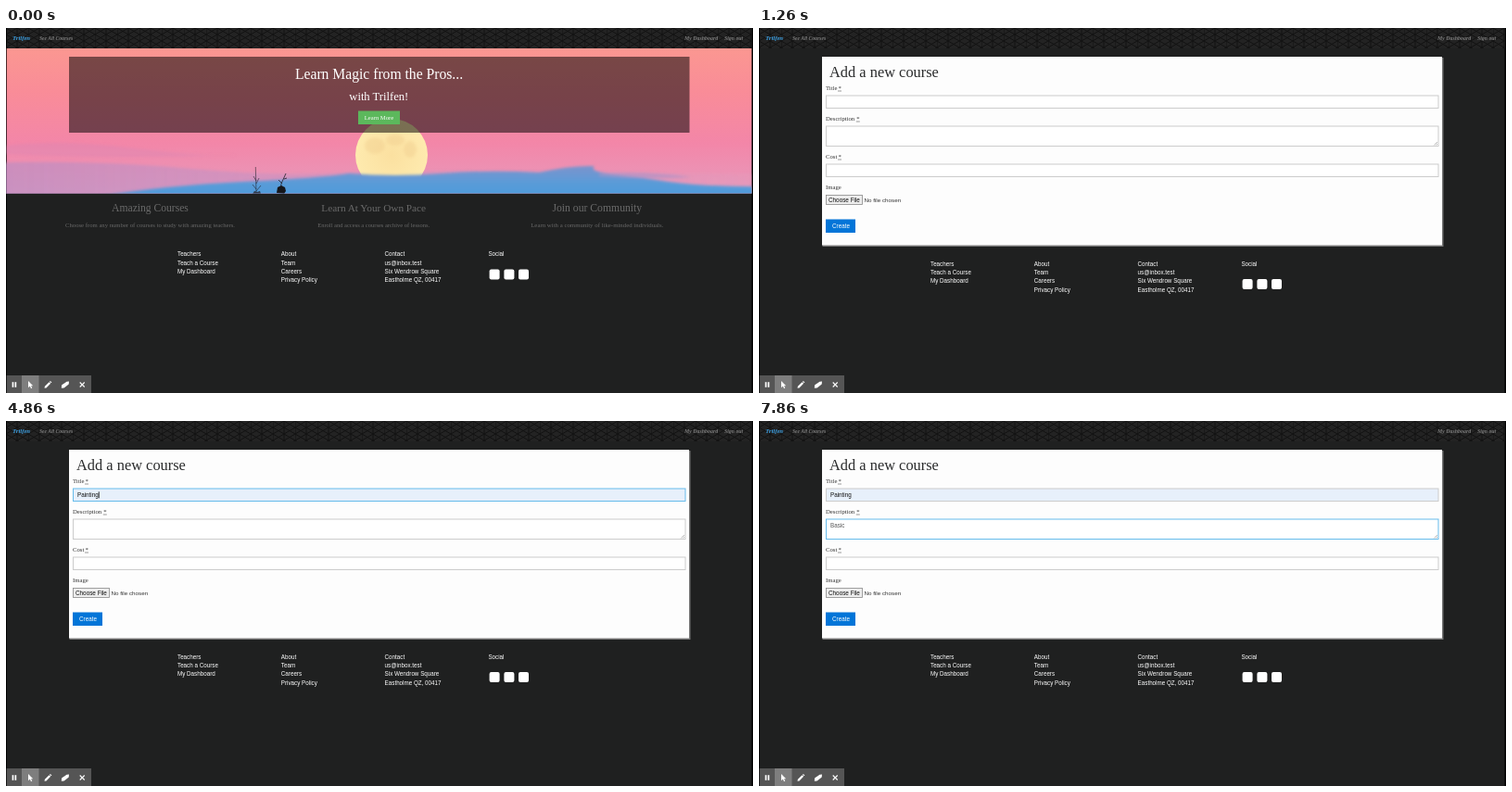
An HTML page that plays this animation: 806 px wide and 394 px high, repeating every 8 s.

```html
<!DOCTYPE html>
<html lang="en">
<head>
<meta charset="utf-8">
<title>Add a new course</title>
<style>
  html, body { margin: 0; width: 100%; height: 100%; overflow: hidden; background: #000; }
  svg { display: block; width: 806px; height: 394px; }
  text { white-space: pre; }
  .serif { font-family: "Liberation Serif", serif; }
  .sans { font-family: "Liberation Sans", sans-serif; }
  .nav { font-family: "Liberation Serif", serif; font-weight: bold; font-style: italic; }
</style>
</head>
<body>
<svg id="stage" viewBox="0 0 806 394" xmlns="http://www.w3.org/2000/svg">
  <defs>
    <pattern id="cubes" width="24" height="14" patternUnits="userSpaceOnUse">
      <path d="M0 0L24 14M24 0L0 14M0 7L12 0L24 7L12 14ZM0 0V14M12 0V14" fill="none" stroke="#0e0e0e" stroke-width=".9"/>
    </pattern>
    <linearGradient id="sky" x2="0" y2="1">
      <stop offset="0" stop-color="#fb9791"/>
      <stop offset=".3" stop-color="#f98c98"/>
      <stop offset=".65" stop-color="#f386a8"/>
      <stop offset="1" stop-color="#e79bbd"/>
    </linearGradient>
    <linearGradient id="dusk">
      <stop offset="0" stop-color="#b48cc4" stop-opacity=".6"/>
      <stop offset=".5" stop-color="#c493c4" stop-opacity=".45"/>
      <stop offset="1" stop-color="#e0a0c0" stop-opacity=".2"/>
    </linearGradient>
    <linearGradient id="cloud" x2="0" y2="1">
      <stop offset="0" stop-color="#7c93cc"/>
      <stop offset=".45" stop-color="#5a9bd8"/>
      <stop offset="1" stop-color="#449bdc"/>
    </linearGradient>
    <radialGradient id="moon">
      <stop offset="0" stop-color="#fbe0a0"/>
      <stop offset="1" stop-color="#feeaae"/>
    </radialGradient>
    <filter id="soft" x="-5%" y="-50%" width="110%" height="200%"><feGaussianBlur stdDeviation="1.6"/></filter>
    <clipPath id="heroClip"><rect x=".7" y="22" width="803.8" height="156.5"/></clipPath>
  </defs>
  <rect x="1" width="803.5" height="394" fill="#1f2020"/>
  <rect x="1" width="803.5" height="22" fill="#232323"/>
  <rect x="1" width="803.5" height="22" fill="url(#cubes)"/>
  <g id="nav"></g>
  <g id="home"></g>
  <g id="form"></g>
  <g id="footer"></g>
  <circle id="click" cx="197" cy="249" fill="#999" opacity=".5"/>
  <g id="tools"></g>
</svg>
<script>
const $ = id => document.getElementById(id);
const text = (x, y, str, size, fill, cls = "sans", anchor = "start", id = "") =>
  `<text id="${id}" class="${cls}" x="${x}" y="${y}" font-size="${size}" fill="${fill}" text-anchor="${anchor}">${str}</text>`;
const rect = (x, y, w, h, fill, more = "") =>
  `<rect x="${x}" y="${y}" width="${w}" height="${h}" fill="${fill}" ${more}/>`;
const path = (d, fill, more = "") => `<path d="${d}" fill="${fill}" ${more}/>`;
const mid = (x, y, str, size, fill) => text(x, y, str, size, fill, "serif", "middle");

$("nav").innerHTML =
  text(7, 13.2, "Trilfen", 6.7, "#3d9fe0", "nav") +
  text(36, 13, "See All Courses", 5.6, "#7c7c7c", "nav") +
  text(732, 13, "My Dashboard", 5.9, "#7c7c7c", "nav") +
  text(775, 13, "Sign out", 5.8, "#7c7c7c", "nav");

const hero = `<g clip-path="url(#heroClip)">
  ${rect(0, 22, 806, 157, "url(#sky)")}
  <g filter="url(#soft)">
    ${path("M0 127Q60 120 140 130T250 137Q120 142 0 136Z", "#d887b4", 'opacity=".35"')}
    ${path("M-20 146Q90 142 200 152T400 154L826 158V190H-20Z", "url(#dusk)")}
  </g>
  <circle cx="416" cy="137" r="39" fill="url(#moon)"/>
  <g fill="#efcb8c" opacity=".4" filter="url(#soft)">
    <ellipse cx="398" cy="127" rx="11" ry="9"/><ellipse cx="420" cy="121" rx="10" ry="6"/><ellipse cx="436" cy="131" rx="7" ry="9"/>
  </g>
  <g filter="url(#soft)">
    ${path("M100 182Q170 170 255 166T370 157Q420 161 470 157T575 156Q610 148 635 149Q628 155 655 158T715 166Q760 172 826 171V190H100Z", "url(#cloud)")}
    ${path("M640 157Q690 154 740 161Q690 164 640 160Z", "#a793c8", 'opacity=".6"')}
  </g>
  <g fill="none" stroke="#22202a">
    ${path("M270 178L269.3 150M270 165l-3-5M270 168l3-6M270 174l-4-5M270 176l5-6", "none", 'stroke-width=".7" opacity=".8"')}
    ${path("M296 178l1-10 5-11M298 168l-4-4M300 163l3-1", "none", 'stroke-width=".8"')}
  </g>
  ${path("M266 179l2-3 3 1 3-1 1 3Z", "#26242c", 'opacity=".8"')}
  ${path("M292 178l1-6 4-2 4 2 1 4-2 3Z", "#15161b")}
</g>`;

$("home").innerHTML = hero +
  rect(68, 31, 669.5, 82, "rgba(0,0,0,.52)") +
  mid(402.5, 54.5, "Learn Magic from the Pros...", 15.65, "#fff") +
  mid(402.3, 77.6, "with Trilfen!", 12.6, "#fff") +
  rect(380, 89.5, 45, 14.5, "#5cb85c") +
  mid(402.5, 99, "Learn More", 6.6, "#fff") +
  [[155.5, "Amazing Courses", 11.6, "Choose from any number of courses to study with amazing teachers.", 6.68],
   [396.7, "Learn At Your Own Pace", 11.25, "Enroll and access a courses archive of lessons.", 6.5],
   [637.8, "Join our Community", 11.7, "Learn with a community of like-minded individuals.", 6.84]]
    .map(([x, head, hs, line, ls]) => mid(x, 197.5, head, hs, "#6a6a6a") + mid(x, 215, line, ls, "#686868")).join("");

const label = (y, str, star) => text(72, y, str, 6.7, "#333", "serif") +
  (star ? text(star, y, "*", 6.7, "#333", "serif") +
    `<path d="M${star - .5} ${y + 1}h4" stroke="#555" stroke-width=".6"/>` : "");
const field = (id, y, h) => rect(72.5, y, 660.5, h, "#fff", `id="${id}" stroke="#ccc" stroke-width="1"`);

$("form").innerHTML =
  rect(68.5, 32, 670, 204, "#777") +
  rect(68, 31, 669, 203.5, "#fdfdfd") +
  text(76, 53.3, "Add a new course", 16.4, "#2a2b2c", "serif") +
  label(67, "Title", 85.5) + field("titleBox", 73, 13.5) +
  label(100, "Description", 105.3) + field("descBox", 106, 21.5) +
  path("M728.5 126.5l3.5-3.5M730.5 126.5l1.5-1.5", "none", 'stroke="#888" stroke-width=".6"') +
  label(141, "Cost", 85.5) + field("costBox", 147, 13.5) +
  label(174, "Image") +
  rect(72.5, 180.5, 39, 10, "#ededed", 'stroke="#8a8a8a" stroke-width=".8"') +
  text(75, 187.7, "Choose File", 6.35, "#111") +
  rect(72, 206.5, 32, 14.5, "#0275d8") +
  text(79, 216, "Create", 6.3, "#fff") +
  text(77, 82, "", 6.3, "#444", "sans", "start", "title") +
  text(77, 115, "", 6.27, "#555", "sans", "start", "desc") +
  text(77, 156, "", 6.3, "#555", "sans", "start", "cost") +
  text(113.5, 187.7, "", 6.25, "#333", "sans", "start", "file") +
  rect(77, 76.5, .8, 7, "#000", 'id="caret"');

$("footer").innerHTML = [
  ["Teachers", "Teach a Course", "My Dashboard"],
  ["About", "Team", "Careers", "Privacy Policy"],
  ["Contact", "us@inbox.test", "Six Wendrow Square", "Eastholme QZ, 00417"],
  ["Social"]
].map((col, c) => col.map((s, r) => text(185 + c * 111.8, 246.4 + r * 9.25, s, 6.27, "#fff")).join("")).join("") +
  [521.6, 537.4, 553].map(x => rect(x, 260.5, 11, 11, "#fff", 'rx="2"')).join("");

$("tools").innerHTML =
  rect(.7, 375, 91.3, 19, "#555") + rect(17, 375, 18.5, 19, "#7e7e7e") +
  rect(6.6, 382.2, 1.7, 5.6, "#fff") + rect(9.5, 382.2, 1.7, 5.6, "#fff") +
  path("M24 381v7.2l1.8-1.6 1.2 2.6 1.2-.6-1.2-2.4h2.2Z", "#fff") +
  path("M41.5 388.8l.4-2 4.6-4.6 1.6 1.6-4.6 4.6ZM47 381.7l.8-.7 1.6 1.6-.8.7Z", "#fff") +
  path("M60 385.5l5.5-3.8 2.5-.2-.3 3-5 4-2.9.2Z", "#fff") +
  path("M79.7 382.5l5 5M84.7 382.5l-5 5", "none", 'stroke="#fff" stroke-width="1.1"');

const LOOP = 8000, FORM = 660, CLEAR = 730, FILL = 4860, TITLE = 1880, DESC = 5370;
const titleKeys = [[0, "Painting"], [CLEAR, ""], [3530, "P"], [FILL, "Painting"]];
const descKeys = [[0, "Basic Painting Techniques"], [CLEAR, ""], [6200, "B"], [6400, "Ba"],
  [6530, "Bas"], [6600, "Basi"], [6660, "Basic"], [7330, "Basic "]];
const caretStarts = [1930, 3530, FILL, 5400, 6200, 6400, 6530, 6600, 6660, 7330];
const BLINK = 530;

const clamp = v => Math.max(0, Math.min(1, v));
const at = (keys, t) => keys.filter(k => k[0] <= t).pop()[1];
const show = (el, on) => el.setAttribute("visibility", on ? "visible" : "hidden");
const put = (id, str) => { if ($(id).textContent !== str) $(id).textContent = str; };
const blend = (a, b, k) => `rgb(${a.map((v, i) => Math.round(v + (b[i] - v) * k))})`;
const border = (id, k) => $(id).setAttribute("stroke", blend([204, 204, 204], [102, 187, 235], k));

function render(t) {
  const onForm = t >= FORM, filled = t < CLEAR;
  $("home").style.display = onForm ? "none" : "";
  $("form").style.display = onForm ? "" : "none";
  $("footer").setAttribute("transform", `translate(0 ${onForm ? 10.6 : 0})`);

  const press = clamp((t - 460) / 140);
  show($("click"), press > 0 && !onForm);
  $("click").setAttribute("r", 2 + 3.5 * press);

  put("title", at(titleKeys, t));
  put("desc", at(descKeys, t));
  put("cost", filled ? "10.00" : "");
  put("file", filled ? "art-palette.jpg" : "No file chosen");

  const toDesc = clamp((t - DESC) / 150);
  border("titleBox", clamp((t - TITLE) / 150) - toDesc);
  border("descBox", toDesc);
  $("titleBox").setAttribute("fill", t >= FILL ? "#e7f0fb" : "#fff");
  $("title").setAttribute("fill", t >= FILL ? "#111" : "#444");

  const start = caretStarts.filter(s => s <= t).pop();
  const inDesc = t >= 5400;
  show($("caret"), onForm && start !== undefined && Math.floor((t - start) / BLINK) % 2 === 0);
  $("caret").setAttribute("x", 77 + (onForm ? $(inDesc ? "desc" : "title").getComputedTextLength() : 0));
  $("caret").setAttribute("y", inDesc ? 109.3 : 76.3);
}

const begin = performance.now();
function tick() {
  render((performance.now() - begin) % LOOP);
  requestAnimationFrame(tick);
}
tick();
</script>
</body>
</html>
```
